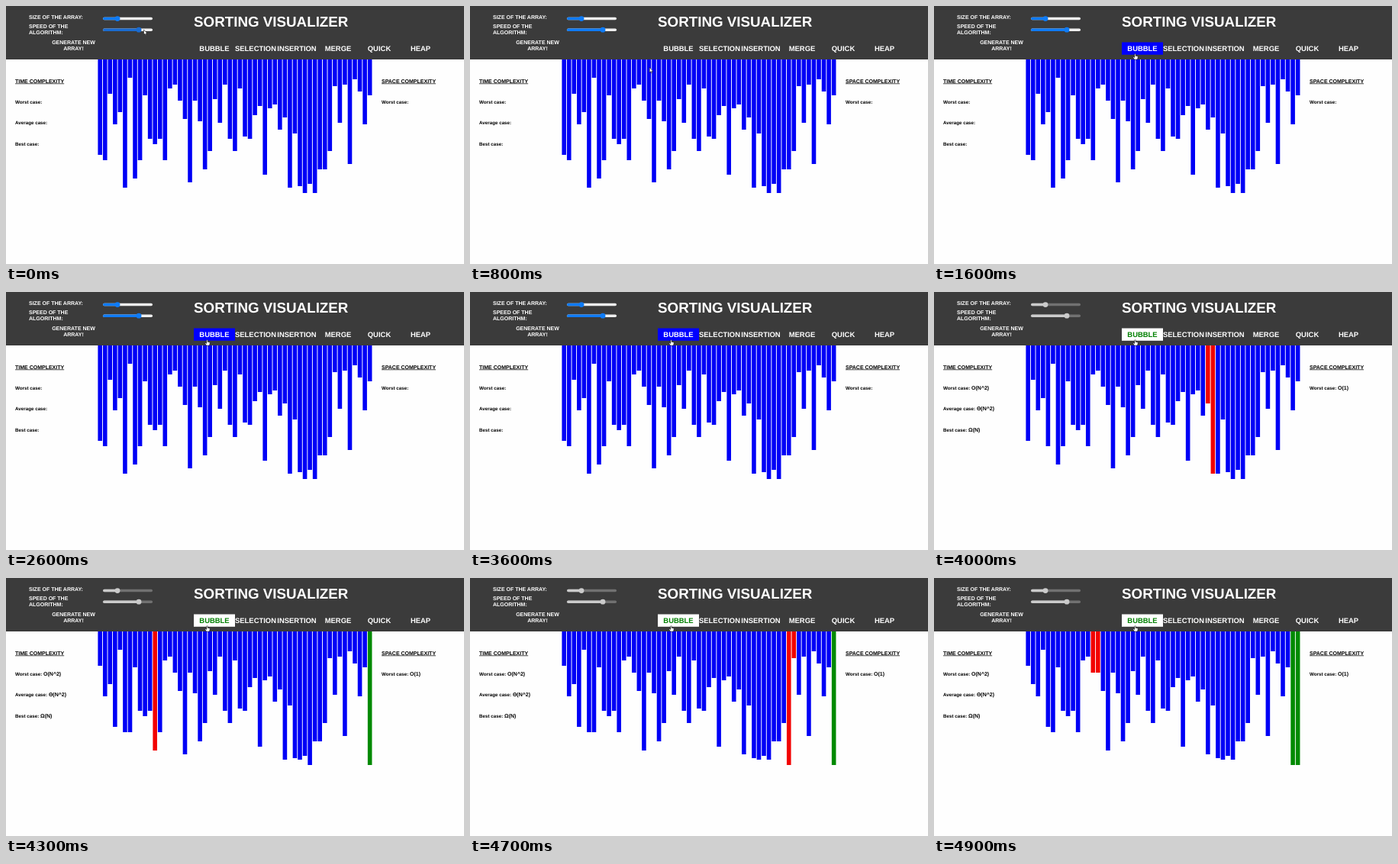
These frames come from a looping animation (600 by 338 pixels, 5000 ms). An HTML page:

```html
<!DOCTYPE html>
<html lang="en">
<head>
<meta charset="utf-8">
<title>Sorting Visualizer</title>
<style>
  html, body { margin: 0; height: 100%; overflow: hidden; background: #fefefe; }
  svg { display: block; }
  text { font: bold 7px "Liberation Sans", Arial, sans-serif; fill: #000; text-rendering: geometricPrecision; white-space: pre; }
  .head text { fill: #fff; }
  .head .title { font-size: 18.8px; }
  .nav text { font-size: 9.45px; text-anchor: middle; }
  .mid { text-anchor: middle; }
  .case { font-size: 6.25px; }
  .cost { font-size: 7px; }
  .under { text-decoration: underline; }
</style>
</head>
<body>
<svg id="stage" width="600" height="338" viewBox="0 0 600 338">
  <g id="bars"></g>
  <g class="head">
    <rect width="600" height="70" fill="#3b3b3b"/>
    <text x="30" y="16.6">SIZE OF THE ARRAY:</text>
    <text x="30" y="29.2">SPEED OF THE</text>
    <text x="30" y="37.4">ALGORITHM:</text>
    <text class="mid" x="88.5" y="49.7">GENERATE NEW</text>
    <text class="mid" x="88.5" y="58">ARRAY!</text>
    <text class="title" x="246" y="27">SORTING VISUALIZER</text>
    <g id="sliders"></g>
    <rect id="button" x="246" y="47.5" width="54" height="16.3"/>
    <g class="nav" id="nav"></g>
  </g>
  <text class="under" x="12" y="100.5">TIME COMPLEXITY</text>
  <text class="under" x="492" y="100.5">SPACE COMPLEXITY</text>
  <text class="case" x="12" y="127.8">Worst case: <tspan class="cost">O(N^2)</tspan></text>
  <text class="case" x="12" y="155.2">Average case: <tspan class="cost">Θ(N^2)</tspan></text>
  <text class="case" x="12" y="182.6">Best case: <tspan class="cost">Ω(N)</tspan></text>
  <text class="case" x="492" y="127.8">Worst case: <tspan class="cost">O(1)</tspan></text>
  <g id="cursor" fill="#fff" stroke="#000" stroke-width=".5" stroke-linejoin="round">
    <path id="arrow" d="M0 0V6.6L1.5 5.3 2.5 7.5 3.5 7 2.5 5H4.6Z"/>
    <path id="hand" d="M-.7 .7Q0-.5 .7 .7V3L3 3.5Q3.8 3.8 3.7 4.6L3 7.8H-.9L-2.7 5.2Q-2.5 4.1-1.6 4.5L-.7 5.2Z"/>
  </g>
</svg>
<script>
const LOOP = 5000, FRAME = 100, CLICK = 3700;
const BLUE = "#0000f6", RED = "#f20000", GREEN = "#008a00", YELLOW = "#ff0";
const $ = id => document.getElementById(id);

const START = [
  195, 202, 115, 155, 139, 238, 94, 226, 202, 117, 174, 181, 174, 202, 108, 103, 124, 148, 231,
  124, 151, 214, 190, 122, 153, 103, 174, 190, 108, 171, 174, 143, 131, 221, 134, 129, 162, 146,
  238, 167, 236, 245, 233, 245, 214, 214, 190, 105, 153, 103, 207, 96, 112, 155, 117
].map(y => y - 70);
const PITCH = 360 / START.length;

// key times: [ms, values...]
const PROGRESS = [[3600, 0], [3700, 62], [4000, 213], [4300, 363], [4700, 554], [4900, 662]];
const PATH = [[700, 180.5, 31], [900, 290, 130], [1000, 342, 178], [1200, 346, 162], [1500, 263.5, 62.3]];

function add(parent, name, attrs, text) {
  const el = document.createElementNS("http://www.w3.org/2000/svg", name);
  for (const k in attrs) el.setAttribute(k, attrs[k]);
  if (text) el.textContent = text;
  return parent.appendChild(el);
}

function along(keys, t) {
  if (t <= keys[0][0]) return keys[0].slice(1);
  for (let i = 1; i < keys.length; i++) {
    const [a, b] = [keys[i - 1], keys[i]];
    if (t <= b[0]) {
      const p = (t - a[0]) / (b[0] - a[0]);
      return a.slice(1).map((v, k) => v + (b[k + 1] - v) * p);
    }
  }
  return keys[keys.length - 1].slice(1);
}

// every repaint of a bar made by bubble sort, in order: [index, height, colour]
function bubbleSteps(a) {
  const steps = [], paint = (i, c) => steps.push([i, a[i], c]);
  for (let end = a.length - 1; end > 0; end--) {
    for (let j = 0; j < end; j++) {
      paint(j, YELLOW);
      if (a[j] > a[j + 1]) {
        paint(j, RED);
        paint(j + 1, RED);
        [a[j], a[j + 1]] = [a[j + 1], a[j]];
        paint(j, RED);
        paint(j + 1, RED);
      }
      paint(j, BLUE);
    }
    paint(end, GREEN);
  }
  return steps;
}

function slider(y, thumb) {
  const bar = { x: 127, y: y - 1.75, height: 3.5, rx: 1.75 };
  const track = add($("sliders"), "rect", { ...bar, width: 65 });
  const fill = add($("sliders"), "rect", { ...bar, width: thumb - 127 });
  const knob = add($("sliders"), "circle", { cx: thumb, cy: y, r: 3.4 });
  return (main, rest) => {
    track.setAttribute("fill", rest);
    fill.setAttribute("fill", main);
    knob.setAttribute("fill", main);
  };
}

const steps = bubbleSteps([...START]);
const bars = START.map((h, i) => add($("bars"), "rect", { x: 120.4 + i * PITCH, y: 70, width: 5.6 }));
const labels = ["BUBBLE", "SELECTION", "INSERTION", "MERGE", "QUICK", "HEAP"]
  .map((s, i) => add($("nav"), "text", { x: 273 + 54 * i, y: 59 }, s));
const sizeSlider = slider(16.6, 146), speedSlider = slider(31.2, 174);
const costs = document.querySelectorAll(".cost");

function draw(t) {
  const clicked = t >= CLICK;
  const heights = [...START], colors = START.map(() => BLUE);
  for (const [i, h, c] of steps.slice(0, Math.round(along(PROGRESS, t)[0]))) {
    heights[i] = h;
    colors[i] = c;
  }
  bars.forEach((bar, i) => {
    bar.setAttribute("height", heights[i]);
    bar.setAttribute("fill", colors[i]);
  });

  const [x, y] = along(PATH, t);
  const hover = t >= 1500;
  $("cursor").setAttribute("transform", `translate(${x} ${y})`);
  $("arrow").style.display = hover ? "none" : "";
  $("hand").style.display = hover ? "" : "none";
  $("button").setAttribute("fill", clicked ? "#fff" : hover ? "#00f" : "none");
  labels[0].style.fill = clicked ? "green" : "#fff";

  const off = ["#cbcbcb", "#717171"], on = ["#0f7bf5", "#efefef"];
  sizeSlider(...(clicked ? off : on));
  speedSlider(...(clicked ? off : t <= 700 ? ["#1a6bd0", "#efefef"] : on));
  costs.forEach(el => el.style.visibility = clicked ? "visible" : "hidden");
}

const begin = performance.now();
function tick() {
  const t = (performance.now() - begin) % LOOP;
  draw(Math.floor(t / FRAME) * FRAME);
  requestAnimationFrame(tick);
}
tick();
</script>
</body>
</html>
```
